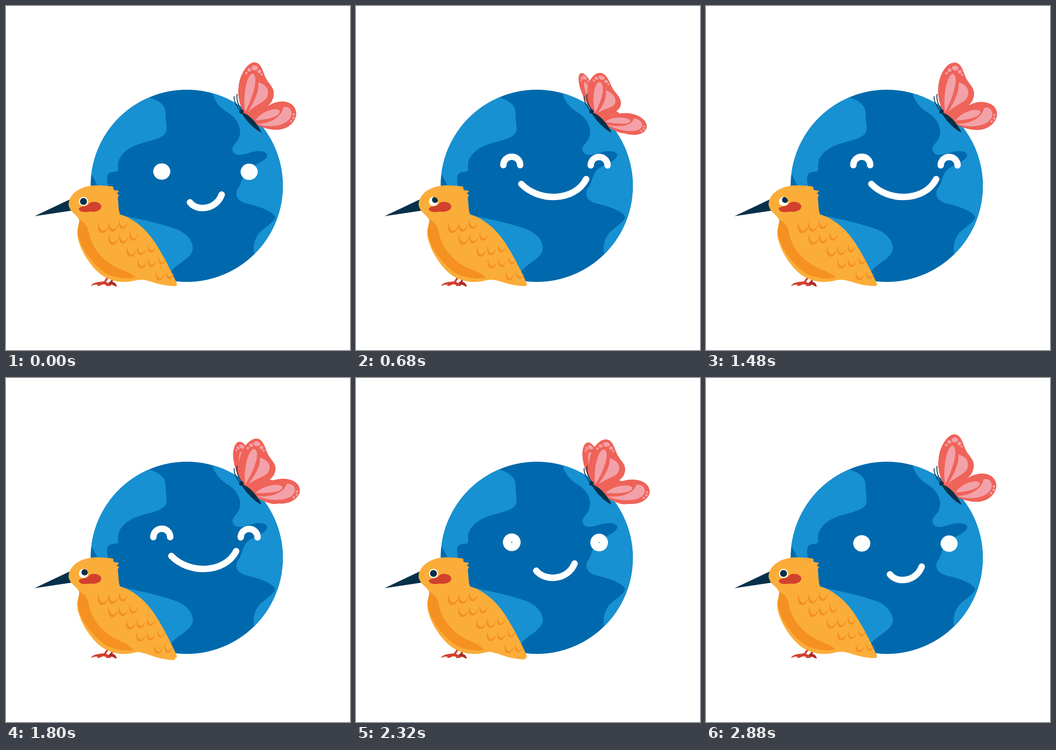
An HTML page for the animation above (2920 ms loop, 748 by 748 pixels).

```html
<!DOCTYPE html>
<html lang="en">
<head>
<meta charset="utf-8">
<title>Happy planet</title>
<style>
html, body { margin: 0; width: 100%; height: 100%; overflow: hidden; background: #fff; }
svg { display: block; width: 100%; height: 100%; }
.land { fill: #1791d1; }
.amber { fill: #fbad3a; }
.orange { fill: #f49121; }
.navy { fill: #06304a; }
.red { fill: #d1412e; }
.line { fill: none; stroke-linecap: round; stroke-linejoin: round; }
.coral { fill: #ef6358; }
.pink { fill: #f3a1a9; }
</style>
</head>
<body>
<svg viewBox="0 0 748 748">
  <defs>
    <clipPath id="disc"><circle cx="393" cy="391" r="209"/></clipPath>
    <clipPath id="socket"><circle cx="168.5" cy="425" r="10"/></clipPath>
    <path id="feather" class="orange" d="M-11,-15 C-12,2 -6,8 1,8 C8,7 11,0 13,-12 C8,-3 6,2 2,2 C-5,1 -8,-6 -11,-15Z"/>
    <g id="upper">
      <path class="coral" d="M518,235 C508,215 503,195 506,175 C508,150 525,122 541,122.500 C555,124 558,142 565,157 C572,171 584,177 582,194 C580,208 573,214 567,219 C560,228 548,240 535,247Z"/>
      <g class="pink">
        <path d="M520,231 C515,205 521,150 536,147 C549,150 541,190 520,231Z"/>
        <path d="M526,231 C540,207 550,187 549,166 C565,171 572,180 569,194 C565,210 545,212 526,231Z"/>
        <ellipse cx="541" cy="134.500" rx="7" ry="5.500"/>
        <circle cx="529" cy="139" r="4"/>
        <circle cx="522.500" cy="146" r="2.800"/>
        <circle cx="551" cy="142.500" r="4"/>
        <circle cx="556" cy="149" r="2.500"/>
      </g>
    </g>
    <g id="lower">
      <path class="coral" d="M532,245 C550,235 573,205 605,208 C624,210 633,224 630.500,239 C625,260 605,270 585,269 C567,268 552,262 545,258Z"/>
      <g class="pink">
        <path d="M542,249 C556,228 589,219 595,228 C597,240 570,247 542,249Z"/>
        <path d="M545,256 C575,257 600,240 603,220 C615,216 624,227 620,239 C612,262 570,266 545,256Z"/>
        <circle cx="625.500" cy="235.500" r="2.600"/>
        <circle cx="625" cy="243" r="2.600"/>
        <circle cx="619.500" cy="250" r="2.600"/>
      </g>
    </g>
  </defs>

  <circle cx="393" cy="391" r="209" fill="#0069ad"/>
  <g class="land" clip-path="url(#disc)">
    <path d="M302,196 C338,206 347,217 347,235 C347,250 350,262 349,270 C346,288 318,291 290,300 C264,308 248,323 244,340 C242,352 247,358 240,360 C232,362 222,359 220,372 C219,381 222,387 222,400 L204,400 L184,362 L170,200Z"/>
    <path d="M250,455 C290,463 345,475 375,487 C398,498 408,516 406,530 C401,551 370,560 358,579 L300,600 L240,500Z"/>
    <path d="M448,180 C450,206 465,221 484,233 C506,247 514,270 506,288 C500,300 488,306 494,317 C500,329 520,322 535,317.500 C550,313 569,316 568,325 C566,336 545,343 530,352 C512,364 516,382 504,397 C496,411 503,425 525,430 C550,435 583,448 585,459 C585,468 565,480 552,492 C540,505 536,525 540,541 L640,541 L640,180Z"/>
  </g>

  <g stroke="#fff">
    <path class="line eye"/>
    <path class="line eye" transform="translate(190 .5)"/>
    <path id="smile" class="line" stroke-width="14"/>
  </g>

  <!-- butterfly -->
  <use id="farLower" href="#lower"/>
  <use id="farUpper" href="#upper"/>
  <use id="nearLower" href="#lower"/>
  <use id="nearUpper" href="#upper"/>
  <path class="line" stroke="#06304a" stroke-width="1.8" d="M509,227 C501,217 495,207 496,197 M512,225 C504,214 501,202 502.500,192"/>
  <circle class="navy" cx="512" cy="229.500" r="5"/>
  <path class="navy" d="M512,232 C526,232 546,254 556,275.500 C539,268 520,247 512,232Z"/>

  <!-- bird -->
  <path class="line" stroke="#d1412e" stroke-width="4" d="M223,588 L214,601"/>
  <path class="line" stroke="#b02a25" stroke-width="4" d="M235,589 L228,601"/>
  <path fill="#b02a25" d="M225,600 C233,597 240,603 241,610 C236,610 233,606 230,606 C226,608 222,609 217,609Z"/>
  <path class="red" d="M211,599 C216,598 222,602 228,606 L227,609 C220,609 216,605 212,605 C207,606 204,609 198,609 L199,606 C195,605 190,606 185,609 C187,602 198,600 211,599Z"/>
  <path class="navy" d="M62,457 L140,420 L149,444Z"/>
  <path class="amber" d="M136,432 C137,406 166,390 195,390 C212,390 225,391 233,393 L234,400 L246,402 L241,408 L246,411 L243,416 C245,430 244,444 248,453 C285,465 309,492 325,516 C345,548 360,578 371.500,604 C372,608 370,609 366,609 C345,608 330,604 318,600 C305,596 295,594 285,596 C270,600 262,600 255,600 C235,600 217,592 204,582 C178,560 155,520 155,492 C155,480 161,471 159,465 C153,452 139,449 136,432Z"/>
  <path class="orange" d="M159,465 C171,468 178,480 180,492 C187,530 215,556 242,569 C260,577 274,582 283,590 C270,595 240,592 220,583 C190,565 157,520 156,492 C156,480 160,472 159,465Z"/>
  <g id="wing">
    <path class="amber" d="M248,455 C285,465 309,492 325,516 C345,548 360,578 371.500,604 C372,608 370,609 366,609 C345,608 330,604 318,600 C305,596 295,594 284,592 C265,575 205,540 205,475 C215,458 232,453 248,455Z"/>
    <g id="feathers"></g>
  </g>
  <path class="red" d="M158,441 C163,433 175,438 180,430 C187,423 203,425 207,434 C209,444 195,449 183,447 C172,449 160,449 158,441Z"/>
  <circle cx="168.500" cy="425" r="10" fill="#fff"/>
  <g clip-path="url(#socket)"><circle id="pupil" class="navy"/></g>
</svg>
<script>
const LOOP = 2920, STEP = 40, FLAP = LOOP / 2;
const $ = id => document.getElementById(id);
const put = (el, attrs) => { for (const k in attrs) el.setAttribute(k, attrs[k]); };
const mix = (a, b, u) => a + (b - a) * u;

// Smooth step from 0 to 1 between two times
function ease(t, from, to) {
  const u = Math.min(1, Math.max(0, (t - from) / (to - from)));
  return u * u * (3 - 2 * u);
}
// Rises during one span and falls back during another
const hold = (t, up, upEnd, down, downEnd) => ease(t, up, upEnd) - ease(t, down, downEnd);

// Rows of feathers step down the wing; each row curves up to the right.
function featherRows() {
  let marks = "";
  for (let row = 0; row < 5; row++) {
    const count = row < 4 ? 3 : 2;
    for (let i = 0; i < count; i++) {
      const x = 209 + 31 * row + 22 * i - 8 * (row % 2), y = 486 + 26 * row - 2 * i * (i + 1) / 1.5;
      marks += `<use href="#feather" transform="translate(${x} ${y}) rotate(10) scale(${1 - .08 * i - .05 * row})"/>`;
    }
  }
  return marks;
}
$("feathers").innerHTML = featherRows();

// Each eye is a thick arc: a semicircle when happy, closed into a disc when open.
function drawEyes(t) {
  const happy = hold(t, 0, 360, 2000, 2400);
  const squash = 1 - .08 * ease(t, 2800, LOOP) - .08 * (1 - ease(t, 0, 360));
  const turn = mix(3.1, Math.PI / 2, happy), r = mix(9.25, 18.3, happy);
  const ry = r * squash, cy = mix(377 - 18.5 * squash, 346, happy);
  const x = r * Math.sin(turn), y = cy - ry * Math.cos(turn);
  document.querySelectorAll(".eye").forEach(e => put(e, {
    d: `M${338.7 - x},${y} A${r},${ry} 0 1 1 ${338.7 + x},${y}`,
    "stroke-width": mix(18.5, 14, happy)
  }));
}

function drawSmile(t) {
  const wide = hold(t, 120, 400, 2120, 2400), lift = 12 * hold(t, 440, 600, 2120, 2400);
  const x1 = mix(400, 359.5, wide), x2 = mix(469, 500.5, wide);
  const y1 = mix(427, 399, wide) - lift, y2 = y1 - mix(17, 10.5, wide);
  const bend = mix(16, 37, wide), depth = mix(21, 39, wide);
  put($("smile"), { d: `M${x1},${y1} C${x1 + bend},${y1 + depth} ${x2 - bend * .7},${y2 + depth + 11} ${x2},${y2}` });
}

// Swing a wing about the body axis: squash across it, shear along it.
function swing(id, squash, shear) {
  const m = new DOMMatrix().translate(530, 248).rotate(45.8)
    .multiply(new DOMMatrix([1, 0, -shear, squash, 0, 0])).rotate(-45.8).translate(-530, -248);
  put($(id), { transform: m.toString() });
}

function drawButterfly(t) {
  const u = t % FLAP / FLAP, peak = .46;
  const p = u < peak ? u / peak : ((1 - u) / (1 - peak)) ** 2;
  const near = 1 + .12 * p - .36 * p * p, far = 1 - .85 * p + .31 * p * p;
  const back = -.18 * p ** .8;
  swing("farLower", far, back);
  swing("farUpper", far, back);
  swing("nearLower", near, .26 * p ** .6);
  swing("nearUpper", near, .12 * (1 - (1 - p) ** 3));
}

// Damped wing wag
function wag(t) {
  const u = t / 720;
  return u < 0 || u > 1 ? 0 : 5.6 * (1 - u) * Math.sin(t / 400 * 2 * Math.PI);
}

function drawBird(t) {
  put($("wing"), { transform: `rotate(${wag(t - 280) + wag(t - 1780)} 215 480)` });
  const look = hold(t, 120, 240, 1760, 1880);
  put($("pupil"), { cx: 168.5 + 3.5 * look, cy: 425 - 3.5 * look, r: 7.6 - .9 * look });
}

const start = performance.now();
function frame() {
  const t = Math.floor((performance.now() - start) % LOOP / STEP) * STEP;
  drawEyes(t);
  drawSmile(t);
  drawButterfly(t);
  drawBird(t);
  requestAnimationFrame(frame);
}
frame();
</script>
</body>
</html>
```
